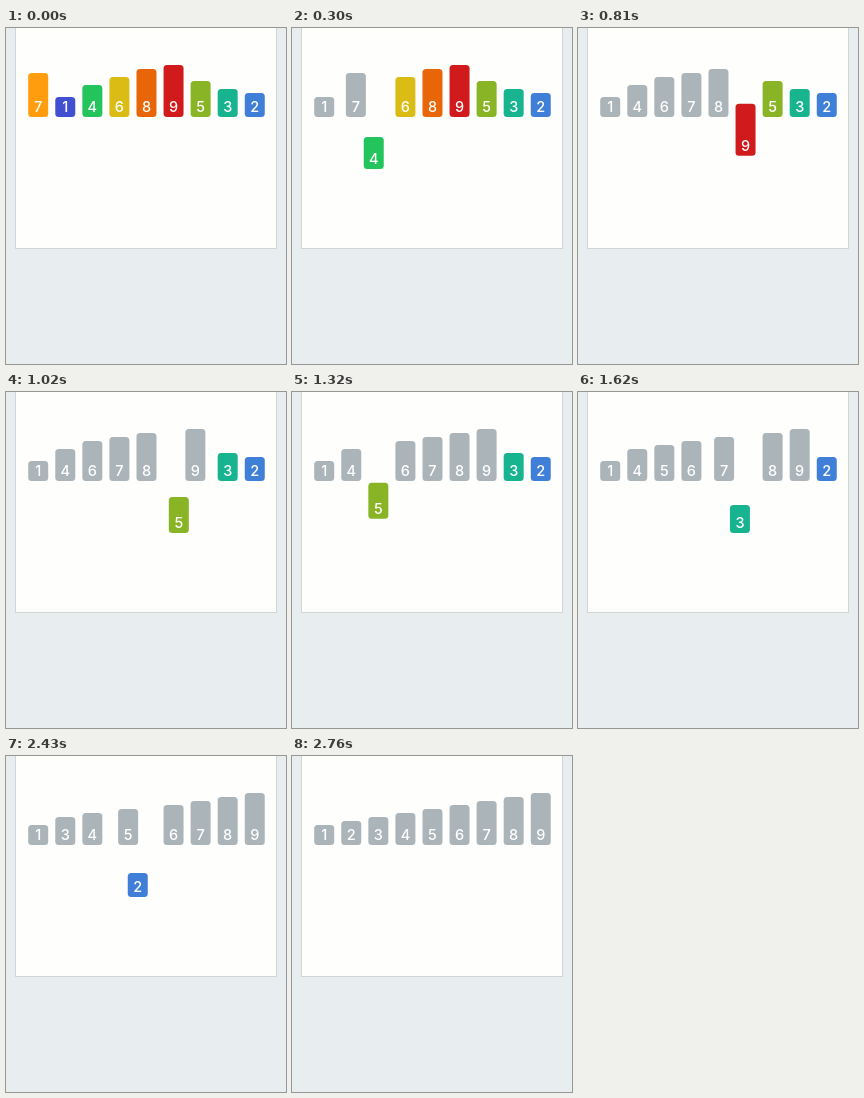
These frames come from a looping animation (280 by 336 pixels, 2.82 s). An HTML page:

```html
<!DOCTYPE html>
<html lang="en">
<head>
<meta charset="utf-8">
<title>Insertion sort</title>
<style>
  html, body { margin: 0; width: 100%; height: 100%; overflow: hidden; background: #e8eef0; }
  svg { display: block; width: 280px; height: 336px; }
  text { font: 500 14.5px Inter, "Open Sans", sans-serif; fill: #fff; text-anchor: middle; }
</style>
</head>
<body>
<svg id="stage" viewBox="0 0 280 336">
  <rect x="9.5" y="-5" width="261" height="225.5" fill="#fefefd" stroke="#d0d4d5"/>
</svg>
<script>
const LOOP = 2820, STEP = 30;
const LIFT = 64.3, SWAP = 84.3;   // durations of a drop or rise, and of one swap
const LEFT = 22.2, PITCH = 27.07, BASE = 89, DEPTH = 52;
const GREY = '#abb5b9';
const COLORS = ['#4150d0', '#407fd8', '#18b490', '#24c45c', '#88b426',
                '#dabc14', '#ff9d0e', '#e86608', '#d01a1c'];
const START = [7, 1, 4, 6, 8, 9, 5, 3, 2];

const stage = document.getElementById('stage');

function add(parent, name, attrs) {
  const node = document.createElementNS('http://www.w3.org/2000/svg', name);
  for (const key in attrs) node.setAttribute(key, attrs[key]);
  return parent.appendChild(node);
}

const bars = START.map((value, col) => {
  const group = add(stage, 'g', {});
  const height = 16 + 4 * value;
  const rect = add(group, 'rect', { y: -height, width: 20, height, rx: 3.5 });
  add(group, 'text', { x: 10, y: -4.8 }).textContent = value;
  return { value, col, group, rect, moves: [], sortedAt: 1 };
});

// Run the sort once and record every move with its start time.
function plan() {
  const order = bars.slice();
  let clock = 0;
  const move = (bar, axis, from, to, time) =>
    bar.moves.push({ axis, from, to, at: clock, time });

  for (let i = 1; i < order.length; i++) {
    const bar = order[i];
    move(bar, 'y', 0, 1, LIFT);
    clock += LIFT;
    let j = i;
    for (; j > 0 && order[j - 1].value > bar.value; j--) {
      move(bar, 'x', j, j - 1, SWAP);
      move(order[j - 1], 'x', j - 1, j, SWAP);
      clock += SWAP;
      order[j] = order[j - 1];
    }
    order[j] = bar;
    move(bar, 'y', 1, 0, LIFT);
    clock += LIFT;
    bar.sortedAt = clock;
  }
}

const ease = p => (1 - Math.cos(Math.PI * p)) / 2;

function draw(t) {
  for (const bar of bars) {
    const pos = { x: bar.col, y: 0 };
    for (const m of bar.moves) {
      if (t < m.at) break;
      const p = Math.min(1, (t - m.at) / m.time);
      pos[m.axis] = m.from + (m.to - m.from) * ease(p);
    }
    const x = LEFT + PITCH * pos.x, y = BASE + DEPTH * pos.y;
    bar.group.setAttribute('transform', `translate(${x} ${y})`);
    bar.rect.setAttribute('fill', t >= bar.sortedAt ? GREY : COLORS[bar.value - 1]);
  }
}

plan();
draw(0);
const origin = performance.now();
function tick() {
  const t = (performance.now() - origin) % LOOP;
  draw(Math.floor(t / STEP) * STEP);
  requestAnimationFrame(tick);
}
requestAnimationFrame(tick);
</script>
</body>
</html>
```
